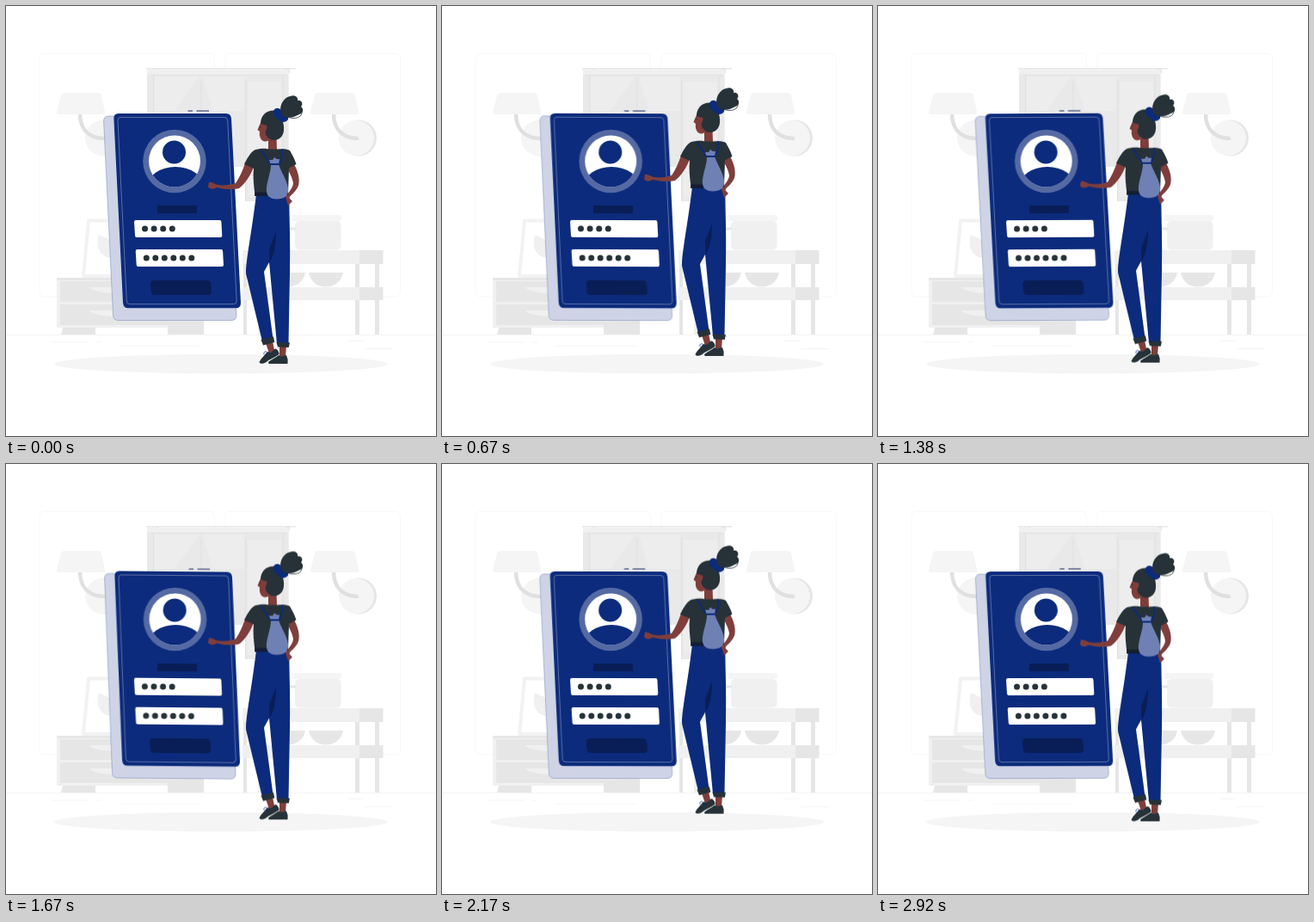
Write an HTML page without scripts that moves like this. It is 500 px wide and 500 px high and loops after 2.96 s.

```html
<!DOCTYPE html>
<html lang="en">
<head>
<meta charset="utf-8">
<title>Login</title>
<style>
html, body { margin: 0; width: 100%; height: 100%; overflow: hidden; background: #fff; }
svg { display: block; width: 100vw; height: 100vh; }
.card, .woman { animation: sway 1480ms linear infinite; }
.card { transform-origin: 193px 243px; }
.woman { animation-name: float; }
@keyframes sway {
  25% { transform: rotate(1deg); }
  75% { transform: rotate(-1deg); }
}
@keyframes float {
  50% { transform: translateY(-10px); }
}
.navy { fill: #0c2b7c; }
.deep { fill: #091e57; }
.dark { fill: #263238; }
.skin { fill: #7f3e3b; }
.g1 { fill: #f5f5f5; }
.g2 { fill: #f0f0f0; }
.g3 { fill: #e6e6e6; }
.line { fill: none; stroke-linecap: round; stroke-linejoin: round; }
</style>
</head>
<body>
<svg viewBox="0 0 500 500">
  <defs>
    <g id="lamp">
      <circle class="g3" cx="410" cy="153.500" r="21"/>
      <circle class="g1" cx="407.500" cy="153.500" r="20.500"/>
      <path class="line" d="M381 125C381 143 391 153 408 154" stroke="#e0e0e0" stroke-width="4.500"/>
      <path class="g1" d="M363 101H402Q405 101 406 104L410 123Q410.500 126 408 126H356Q353 126 354 123L359 104Q360 101 363 101Z"/>
    </g>
    <clipPath id="face"><circle cx="196" cy="180.500" r="30"/></clipPath>
  </defs>

  <!-- room -->
  <g fill="none" stroke="#f5f5f5" stroke-width=".7">
    <rect x="39" y="55.300" width="203.500" height="282.500" rx="5"/>
    <rect x="255" y="55.300" width="203.500" height="282.500" rx="5"/>
  </g>
  <path d="M0 382.500H500M417 398.600H450M322.500 401.300H331M396.500 389.300H416M52.500 391H95.500M104.500 391H111M131.500 395.200H225" stroke="#ebebeb" stroke-width=".5"/>

  <path class="g3" d="M163 72H337V73.600H163ZM175 73H177V78H175ZM325 73H330V78H325Z"/>
  <path class="g2" d="M164 74H329V187H164Z"/>
  <path fill="#e9e9e9" d="M164 80H328V187H326V227H278V187H164Z"/>
  <path fill="#ededed" d="M173 82H225L196 122H173ZM229 82H277V122H240ZM281 88H320V222H281Z"/>
  <path d="M171.500 80V187M227 86V187M278.500 86V227M322 80V187" stroke="#dedede" stroke-width=".8"/>
  <path d="M167 80H327" stroke="#e0e0e0" stroke-width=".8"/>

  <use href="#lamp"/>
  <use href="#lamp" x="-295"/>

  <!-- drawers and picture -->
  <path class="line" d="M96 249.500H150L145 314H90Z" stroke="#f2f2f2" stroke-width="4"/>
  <path class="g2" d="M108 266C104 280 109 291 121 293V272Z"/>
  <path class="g2" d="M59 316H230V374H59Z"/>
  <path class="g3" d="M59 316H230V319H59ZM63 320H188V344H63ZM63 347H188V371H63ZM66 374H104V382H64ZM188 366H230V382H188Z"/>
  <path class="g2" d="M97 327H152C150 336 102 336 97 327ZM97 354H152C150 363 102 363 97 354Z"/>

  <!-- shelves -->
  <path class="g3" d="M406 300H411V382H406ZM429 300H434V382H429ZM276 300H280V382H276Z"/>
  <path class="g2" d="M293 342H296V382H293ZM275 284H411V300H275ZM275 327H411V342H275Z"/>
  <path class="g3" d="M411 284H438.500V300H411ZM411 327H438.500V342H411ZM352 310H392C388 332 356 332 352 310ZM308 310H348C344 332 312 332 308 310Z"/>
  <rect class="g1" x="333" y="243" width="57" height="7" rx="2"/>
  <rect class="g2" x="336" y="250" width="53.500" height="33.500" rx="5"/>
  <path d="M328 259H337" stroke="#e6e6e6" stroke-width="3"/>

  <ellipse class="g1" cx="250" cy="416.200" rx="194" ry="11.300"/>

  <!-- login card -->
  <g class="card">
    <path d="M211.500 122H217M221.500 122H236" stroke="#16265c"/>
    <path fill="#ced4e6" stroke="#6f80b4" stroke-width=".5" d="M119 128H250Q256 128 256.400 134L268 360Q268 365.500 262 365.500H131Q125 365.500 124.600 360L113.600 134Q113.500 128 119 128Z"/>
    <path class="navy" d="M131 125H256Q261.500 125 262 131L273 345Q273 351.300 267.500 351.300H142Q136.500 351.300 136 345L125.400 131Q125 125 131 125Z"/>
    <path fill="none" stroke="#8f9dc7" stroke-width=".6" d="M133 129.500H254Q257.500 129.500 257.700 133L268.200 343Q268.200 346.600 265 346.600H144Q140.500 346.600 140.300 343L130 133Q130 129.500 133 129.500Z"/>
    <circle cx="196" cy="180.500" r="36.800" fill="#5569a3"/>
    <circle cx="196" cy="180.500" r="30" fill="#fff"/>
    <g class="navy" clip-path="url(#face)">
      <circle cx="195.500" cy="170" r="13.500"/>
      <ellipse cx="197" cy="209" rx="32" ry="22"/>
    </g>
    <rect class="deep" x="176" y="232" width="46" height="9" rx="1"/>
    <path class="deep" d="M172 319H234Q238 319 238.300 323L239 332Q239 336 235 336H173Q169 336 168.700 332L168 323Q168 319 172 319Z"/>
    <path id="field" fill="#fff" d="M151 249H248.500Q250.300 249 250.400 251L251.300 267Q251.300 269 249.500 269H152Q150.100 269 150 267L149 251Q149 249 151 249Z"/>
    <use href="#field" x="1.700" y="34"/>
    <g class="line" stroke="#263238" stroke-width="7">
      <path d="M161.500 259H194" stroke-dasharray="0 10.600"/>
      <path d="M163.300 293H217" stroke-dasharray="0 10.500"/>
    </g>
  </g>

  <g class="woman">
    <!-- feet -->
    <path class="skin" d="M302 392L310 390L312.500 402L306 404ZM318 395H326L325 408H318Z"/>
    <path class="dark" d="M294.500 414C297 409 301 406 304 402L308 403L313 398.500C316 399 318 403 317.500 405C312 409 306 411 302 414.500C299 416 295 416.500 294.500 414ZM305 414C308 411 314 409 317 406L320 407.500L326 406Q328.500 411 327.500 416H305.500Z"/>
    <path class="line" d="M303 402Q299 401 300 405M303 404L307 405" stroke="#0c2b7c" stroke-width=".7"/>

    <!-- trousers -->
    <path class="navy" d="M291 219L329.500 221C329 240 331 270 330 310L328.500 393H315L306 298L300 309L310.500 387L298 390L279.200 312C278 300 286 262 291 219Z"/>
    <path class="deep" d="M314 262L306 283L306.500 298C312 289 314 276 314 262Z"/>
    <path class="dark" d="M296.500 388L311 384.500L312.300 391L299 394.500ZM314.500 391L330 391.300L328.800 397L316 396.500Z"/>

    <!-- arms -->
    <path class="skin" d="M278 183L288 187C285 196 278 207 271 212C263 214 252 213 245 211C241 214 236 213 235 210L236 205C239 204 242 207 246 208C254 209 261 208 267 206C271 200 275 192 278 183Z"/>
    <path class="skin" d="M326 187L335 184C340 193 342 202 340 209C337 216 332 219 329 223L333 227L328 232L325 222C330 215 334 210 334 206C333 199 329 193 326 187Z"/>

    <!-- shirt -->
    <path class="skin" d="M305 152H314.500L315 168Q310 171 305 168Z"/>
    <path class="dark" d="M290 167C299 165 303 166 306 166.500H315C322 166 327 166 330 168C333 173 336 179 337.500 184L329 188.500L328 220H289.500C288 208 287 198 288 189L277 184C280 178 284 170 290 167Z"/>
    <path fill="#121d35" d="M289.500 216.500H304V221H289Z"/>

    <!-- bag -->
    <path class="line" d="M297 168L307 183M321 167C321 175 321 180 317 183" stroke="#0c2b7c" stroke-width="2"/>
    <path fill="#6f80b4" d="M306 179L310 179L312 176L315 178L318 178L317 184C320 193 327 203 328 212C329 221 323 224.500 315 224.500C306 224.500 302 220 303 211C304 202 308 193 308 185Z"/>
    <path class="line" d="M307.500 184H317" stroke="#0c2b7c" stroke-width="1.800"/>

    <!-- head -->
    <path class="skin" d="M297 134C295 137 294 141 292.500 144L295 146C294 152 297 158 302 157.500L310 155L309 136Z"/>
    <path class="dark" d="M296 137C296 128 302 121 312 121.500C320 126 324 136 323 145C322 153 316 157.500 308 155.500C302 152 300 147 303 142C304 139 300 138 296 137Z"/>
    <path class="skin" d="M299 140Q303 136 303.500 141Q303 146 300 145Z"/>
    <path d="M294.500 141L297 140.500" stroke="#263238" stroke-width=".8"/>
    <path class="navy" d="M311 122C313 118 317 118 320 121C326 124 329 128 328 132C325 136 320 136 317 132C312 129 310 126 311 122Z"/>
    <path class="dark" d="M320 126C317 117 322 107 330 105C336 103 340 106 339 110C344 109 346 114 343 117C347 120 345 125 341 126C334 130 326 132 320 126Z"/>
    <path class="line" d="M327 129C337 133 346 129 344 121" stroke="#263238" stroke-width=".8"/>
  </g>
</svg>
</body>
</html>
```
